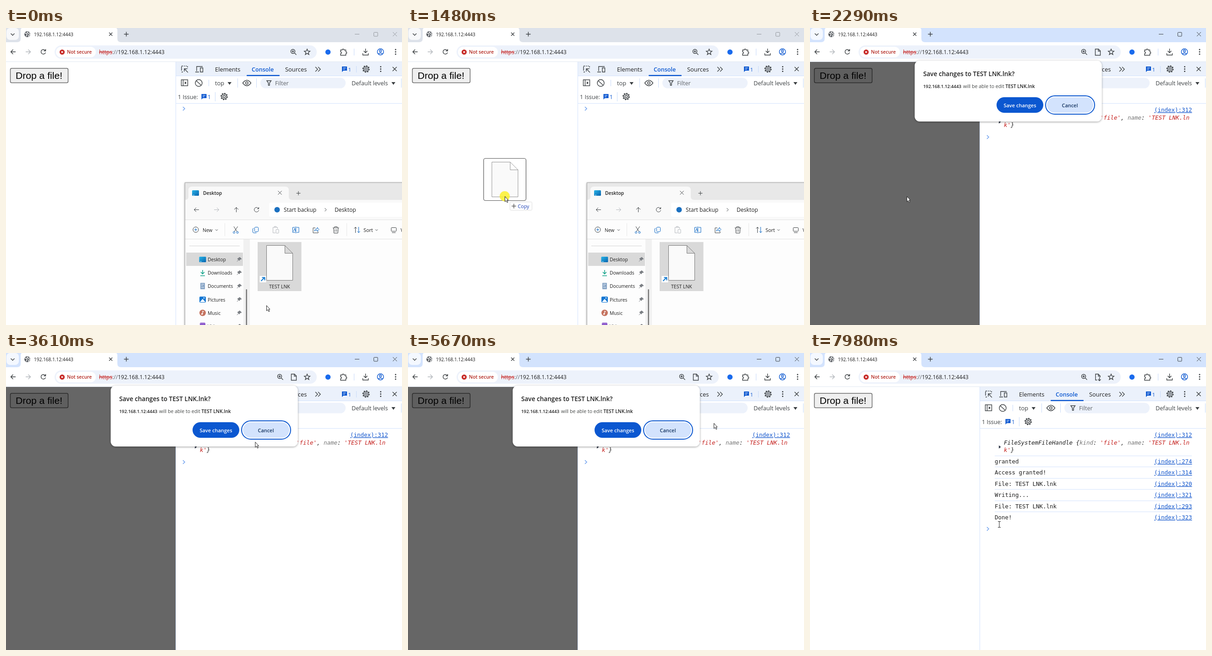
Animation of 864x648 px, one loop 8 s. Source, as an HTML page:

```html
<!DOCTYPE html>
<html lang="en">
<head>
<meta charset="utf-8">
<title>Drop a file</title>
<style>
html, body { margin: 0; width: 100%; height: 100%; overflow: hidden; background: #fff; }
svg { display: block; width: 864px; height: 648px; font: 12.9px "Open Sans", "Noto Sans", sans-serif; fill: #1f1f1f; }
text { white-space: pre; }
.line { fill: none; stroke: #3c4043; stroke-width: 1.4; }
.blue { stroke: #0b66c3; }
.pale { stroke: #b4b8bd; }
.thin { stroke-width: 1; }
.bold { font-weight: 600; }
.small { font-size: 10.3px; }
.tools { fill: #3c4043; }
.mono { font: 12.46px "DejaVu Sans Mono", "Noto Sans Mono", monospace; }
.mono .link { fill: #1155cc; text-decoration: underline; }
.rule { fill: none; stroke: #d3e3fd; }
</style>
</head>
<body>
<svg viewBox="0 0 864 648">
<defs>
  <filter id="shadow" x="-20%" y="-20%" width="140%" height="150%">
    <feDropShadow dx="0" dy="1" stdDeviation="2" flood-opacity=".4"/>
  </filter>
  <linearGradient id="screen" x2="1" y2="1"><stop stop-color="#28b5e8"/><stop offset="1" stop-color="#0862ad"/></linearGradient>
  <g id="monitor"><rect width="15" height="12" rx="1.5" fill="url(#screen)"/><path d="M2 10.500h3" stroke="#bdeaff"/></g>
  <g id="issue"><path d="M0 0h11v9H3L0 12z" fill="#0b57d0"/><path d="M2.500 3h6M2.500 6h4" stroke="#fff" stroke-width="1.200"/></g>
  <g id="gear" class="line"><circle r="2.500"/><circle r="5.500"/><circle r="7" stroke-dasharray="2.750 2.750" stroke-width="2"/></g>
  <path id="pin" d="M1-5l4 4-3 .5-2 3-4-4 3-2zM-2 1l-3 3.500" fill="#7b7f84" stroke="#7b7f84"/>
  <path id="sheet" d="M0 0H40L57 17V76H0zM40 0V17H57" stroke="#777" fill="#fafafa"/>
</defs>

<!-- browser frame -->
<rect width="864" height="648" fill="#fff"/>
<rect id="strip" width="864" height="31"/>
<rect x="1" y="0" width="27" height="26" rx="8" fill="#fff" opacity=".75"/>
<path d="M10.500 12l4 4 4-4" class="line" stroke-width="1.800"/>
<path d="M24 31q8 0 8-8V6q0-8 8-8H235q8 0 8 8V23q0 8 8 8z" fill="#fff"/>
<circle cx="46.500" cy="13.500" r="6.500" fill="#5f6368"/>
<path d="M41 11l4 1 1 3-2 3M48 8l-2 2 3 2 3-1M49 19l1-4 3-1" stroke="#fff" fill="none" stroke-width="1.400"/>
<text x="61" y="17.500" font-size="10.100">192.168.1.12:4443</text>
<path d="M225 10l7 7m0-7l-7 7M257.500 13.500h10m-5-5v10" class="line"/>
<g id="controls" class="line thin"><path d="M761 13.500h10M844 9l9 9m0-9l-9 9"/><rect x="802.500" y="9.500" width="8.500" height="8.500" rx="1"/></g>
<path d="M21 52H11m4.500-5L10.500 52l5 5" class="line"/>
<path d="M43 52h10m-4.500-5l5 5-5 5" class="line pale"/>
<path d="M85.500 49a5 5 0 1 0 .7 4.500M86.500 46v4h-4" class="line"/>
<rect x="106" y="38" width="572" height="29" rx="14.500" fill="#edf2fb"/>
<rect x="109" y="41" width="87" height="23" rx="11.500" fill="#fff"/>
<circle cx="122.500" cy="52.500" r="5.500" fill="#c5221f"/>
<path d="M120.500 50.500l4 4m0-4l-4 4" stroke="#fff" stroke-width="1.300"/>
<text x="133" y="56" class="bold" font-size="10.400" fill="#b3261e">Not secure</text>
<text x="203" y="57" font-size="12"><tspan fill="#c5221f" text-decoration="line-through">https</tspan><tspan fill="#5f6368">://</tspan>192.168.1.12:4443</text>
<g id="zoom" class="line"><circle cx="-1" cy="-1" r="4.500"/><path d="M2.500 2.500l4 4M-3.500-1h5M-1-3.500v5"/></g>
<g id="pageFile" class="line">
  <path id="plainFile" d="M622.500 46h7l4 4v9.500h-11zM629 46v4.500h4.500"/>
  <path id="savedFile" d="M626.500 59h-3.500V46h6l4 4v3M629 46v4.500h4M631.500 53v7m-3-2.500l3 3 3-3"/>
</g>
<path d="M657 46l1.700 4.200 4.500.3-3.500 2.900 1.200 4.500-3.900-2.500-3.900 2.500 1.200-4.500-3.500-2.900 4.500-.3z" class="line"/>
<circle cx="702.500" cy="52.500" r="5.700" fill="#1a6bed"/>
<path d="M730 48h3.500a2 2 0 0 1 4 0h4v4a2 2 0 0 1 0 4v3.500H730V56a2 2 0 0 0 0-4z" class="line"/>
<path d="M759.500 45v15" stroke="#c8dafa"/>
<path d="M784.500 45v9m-4-4l4 4 4-4M778.500 55v4h12v-4" class="line"/>
<g class="line" stroke="#0b57d0" style="stroke:#0b57d0"><circle cx="817" cy="52" r="6.800"/><circle cx="817" cy="50" r="2.200"/><path d="M812.500 56.500q4.500-4 9 0"/></g>
<g class="tools"><circle cx="850" cy="47" r="1.500"/><circle cx="850" cy="52" r="1.500"/><circle cx="850" cy="57" r="1.500"/></g>
<path d="M0 73.500H864" stroke="#e1e8f2"/>

<!-- page -->
<rect x="9.500" y="88" width="126" height="31.500" rx="3" fill="#efefef" stroke="#6b6b6b" stroke-width="1.500"/>
<text x="21" y="111" font-size="21.100" font-family="Liberation Sans, Arial, sans-serif" fill="#000">Drop a file!</text>
<rect id="dim" y="74" width="370" height="574" fill="#000" opacity=".6"/>

<!-- developer tools -->
<rect x="370" y="74" width="494" height="30" fill="#ebf1fb"/>
<path d="M370.500 74V648M371 104.500H864M371 164.500H864" class="rule"/>
<path d="M383 93V84m0-1h3m2 0h2m2 0h2m2 0v3m0 2v1M383 96h3M389 89l8 8M389 95v-6h6" class="line" stroke-dasharray="20 0"/>
<path d="M416 94V84h13M413 96h8M424 87h5.500v9H424z" class="line"/>
<text x="456" y="95">Elements</text>
<text x="536" y="95" class="bold" font-size="12.600" fill="#0b57d0">Console</text>
<rect x="525" y="102.500" width="72" height="2.500" rx="1" fill="#0b57d0"/>
<text x="609" y="95">Sources</text>
<path d="M675 85l5 5-5 5m6-10l5 5-5 5" class="line"/>
<use href="#issue" x="733" y="84"/>
<text x="746.500" y="94.500" font-size="11.500" fill="#0b57d0">1</text>
<path d="M764.500 83v14M442.500 113v14M505.500 110v20M546.500 110v20M862.500 110v20M456.500 140v20" stroke="#c9dbf9"/>
<use href="#gear" x="785.500" y="89.500"/>
<g class="tools"><circle cx="817.500" cy="84.500" r="1.500"/><circle cx="817.500" cy="89.500" r="1.500"/><circle cx="817.500" cy="94.500" r="1.500"/></g>
<path d="M843.500 85l9 9m0-9l-9 9" class="line"/>
<g class="line"><rect x="382.500" y="113" width="14" height="13"/><path d="M386.500 113v13"/><circle cx="420.500" cy="120" r="7.500"/><path d="M415 115l11 10"/></g>
<path d="M390 116.500v6.500l4-3.300zM483.500 118h8.500l-4.200 6zM841 118h8.500l-4.200 6z" class="tools"/>
<text x="456" y="125" class="tools">top</text>
<path d="M516.500 120q9-12 18 0-9 12-18 0z" class="line"/><circle cx="525.500" cy="120" r="2.700" class="line"/>
<rect x="555" y="108.500" width="186" height="23" rx="11.500" fill="#edf2fb"/>
<path d="M569 115h9.500l-3.500 5v5h-2.500v-5z" class="line"/>
<text x="587" y="125" fill="#5f6368" font-size="12.700">Filter</text>
<text x="754" y="125" class="tools" font-size="12.700">Default levels</text>
<text x="375" y="154.500" class="tools" font-size="12.500">1 Issue:</text>
<use href="#issue" x="426.500" y="144"/>
<text x="440" y="154.500" font-size="12" fill="#0b57d0">1</text>
<use href="#gear" x="476" y="149.500"/>
<path id="prompt" d="M-2-4l4 4-4 4" fill="none" stroke="#6ea0ee" stroke-width="1.500"/>
<g id="handle" class="mono">
  <text x="751" y="183" class="link">(index):312</text>
  <path d="M412 201.500v7l4.500-3.500z" fill="#333a4a"/>
  <g font-style="italic">
    <text x="423" y="200">FileSystemFileHandle {<tspan fill="#777">kind</tspan>: <tspan fill="#c5221f">'file'</tspan>, <tspan fill="#777">name</tspan>: <tspan fill="#c5221f">'TEST LNK.ln</tspan></text>
    <text x="423" y="216"><tspan fill="#c5221f">k'</tspan>}</text>
  </g>
</g>
<g id="log" class="mono"></g>

<!-- file manager -->
<g id="explorer">
  <rect x="390" y="337" width="490" height="320" fill="#fff" filter="url(#shadow)"/>
  <rect x="390.500" y="337.500" width="490" height="320" fill="#e8e8e8" stroke="#a9a9a9"/>
  <path d="M391 375q7 0 7-7v-14q0-8 8-8H609q8 0 8 8v14q0 7 7 7H864V648H391z" fill="#f9f9f9"/>
  <path d="M391 419H864V648H391z" fill="#fdfdfd"/>
  <path d="M391 418.500H864M391 460.500H864" stroke="#e0e0e0"/>
  <use href="#monitor" x="406" y="354"/>
  <text x="430" y="364" class="bold small">Desktop</text>
  <g class="line thin">
    <path d="M593.500 355.500l8 8m0-8l-8 8M633.500 360.500h9m-4.500-4.500v9M421 396.500H410.500m4.500-4.500l-4.500 4.500 4.500 4.500M502.500 402V391.500m-4.500 4.500l4.500-4.500 4.500 4.500M551 394a5 5 0 1 0 .5 3.500M551.500 391v3.500h-3.500M695.500 393l3.500 3.500-3.500 3.500"/>
    <path d="M454 396.500h10.500m-4.500-4.500l4.500 4.500-4.500 4.500" class="pale"/>
  </g>
  <rect x="574" y="381" width="300" height="31" rx="4" fill="#fff"/>
  <path d="M695.500 393l3.500 3.500-3.500 3.500" class="line thin"/>
  <circle cx="591.500" cy="396.500" r="6" fill="#1b70c0"/>
  <text x="606" y="400.500" font-size="12.100">Start backup</text>
  <text x="717" y="401" font-size="12.100">Desktop</text>
  <g class="line thin">
    <circle cx="414" cy="440" r="6"/><path d="M411 440h6m-3-3v6" class="blue"/>
    <path d="M457 439.500l2.500 2.500 2.500-2.500M806 439.500l2.500 2.500 2.500-2.500"/>
    <path d="M497 433l7 11M505.500 433l-7 11"/><g class="blue"><circle cx="497.500" cy="446" r="2"/><circle cx="505" cy="446" r="2"/></g>
    <rect x="542.500" y="434.500" width="8" height="10" rx="2" class="blue"/><path d="M540.500 437q-2 0-2 2v6q0 2 2 2h6" class="blue"/>
    <g class="pale"><path d="M588 447h-5.500v-12h10v3M585.500 435v-2h4v2"/><rect x="589" y="439.500" width="6" height="8" rx="1"/></g>
    <g class="blue"><path d="M631 446h-5.500v-11h5.500m3 0h5v11h-5M632.500 433v15"/><path d="M627.500 444l2.500-7 2 7"/></g>
    <path d="M675 436h-5v11h11v-3" /><path d="M673 443q1-5 6-5v-3l4 4.500-4 4.500v-3q-4 0-6 2z" class="blue"/>
    <path d="M713 436h13.500M717 436v-2.500h5.500v2.500M714.500 436l1 11.500h8.500l1-11.500M718 439v5.500m3.500-5.500v5.500"/>
    <path d="M762.500 447v-12.500m-3 3l3-3 3 3"/><path d="M769.500 434v12.500m-3-3l3 3 3-3" class="blue"/>
    <rect x="840.500" y="435.500" width="11" height="8" rx="1"/><path d="M842 446.500h8"/>
  </g>
  <path d="M477.500 426v28M743.500 426v28" stroke="#e6e6e6"/>
  <g class="small"><text x="429" y="444.500">New</text><text x="780" y="444.500" font-size="10.800">Sort</text><text x="861" y="444.500">View</text></g>
  <path d="M400 475.500H510" stroke="#d5d5d5"/>
  <rect x="518" y="461" width="14" height="187" fill="#f1f1f1"/>
  <rect x="523.500" y="570" width="2.500" height="90" rx="1" fill="#777"/>
  <rect x="393" y="490" width="124" height="29" fill="#d9d9d9"/>
  <rect id="hover" x="393" y="519" width="124" height="29" fill="#e5f3ff"/>
  <use href="#monitor" x="421.500" y="499"/>
  <path d="M429 528v8.500m-4-4l4 4 4-4M424 540.500h10" fill="none" stroke="#18a58d" stroke-width="1.600"/>
  <rect x="424" y="556" width="10" height="14" rx="1" fill="#8ba7c7"/><path d="M426 559h6m-6 3h3m-3 4h6" stroke="#e9f2fb"/>
  <rect x="422" y="586" width="14" height="13" rx="2" fill="#1277d3"/><path d="M423 598l6-7 6 7z" fill="#fff"/><circle cx="432" cy="589" r="1.300" fill="#fff"/>
  <circle cx="429" cy="621.500" r="7" fill="#c5735f"/><path d="M429 624v-6l3 1" stroke="#fff" fill="none" stroke-width="1.300"/><circle cx="427.700" cy="624" r="1.700" fill="#fff"/>
  <rect x="423" y="643" width="12" height="12" rx="2" fill="#8149c7"/><path d="M424 645.500h10" stroke="#fff" stroke-dasharray="1.500 1.500"/>
  <g id="places" class="small"></g>
  <rect x="549" y="467" width="95.500" height="107" fill="#d9d9d9"/>
  <use href="#sheet" x="568.500" y="474.500"/>
  <rect x="553.500" y="541" width="14" height="14" fill="#fff"/>
  <path d="M556.500 552l7-7M558.500 544.500h6v6" fill="none" stroke="#0f78d0" stroke-width="2"/>
  <text x="574" y="568" font-size="10.500">TEST LNK</text>
</g>

<!-- permission dialog -->
<g id="dialog">
  <rect x="228.500" y="71" width="408" height="133" rx="11" fill="#fff" filter="url(#shadow)"/>
  <text x="247" y="105" class="bold" font-size="13.600">Save changes to TEST LNK.lnk?</text>
  <text x="247" y="131" class="bold" font-size="9.750">192.168.1.12:4443</text>
  <text x="334" y="131" font-size="10.600" fill="#444746">will be able to edit</text>
  <text x="426.500" y="131" class="bold" font-size="10.300">TEST LNK.lnk</text>
  <rect id="save" x="407" y="151" width="102" height="34" rx="17"/>
  <text x="458" y="172.500" text-anchor="middle" class="bold" font-size="11" fill="#fff">Save changes</text>
  <rect x="514" y="148" width="107" height="40" rx="20" fill="#fff" stroke="#0b57d0" stroke-width="2"/>
  <rect x="517" y="151" width="101" height="34" rx="17" fill="#d3e3fd"/>
  <text x="567" y="172.500" text-anchor="middle" class="bold" font-size="10.900" fill="#14335f">Cancel</text>
</g>

<!-- pointer, with the dragged file -->
<g id="pointer">
  <g id="ghost">
    <rect x="-46" y="-82.500" width="92.500" height="92" rx="4" fill="#fff" fill-opacity=".8" stroke="#555" stroke-width="1.200"/>
    <use href="#sheet" x="-28" y="-74.500" opacity=".8"/>
  </g>
  <circle id="press" r="11" fill="#fbf02d" opacity=".85"/>
  <g id="tip">
    <rect id="tipBox" x="11.500" y="12.500" height="18" rx="2" fill="#fff" stroke="#dedede"/>
    <path id="tipSign" fill="none" stroke="#333" stroke-width="1.200"/>
    <text id="tipText" x="28.500" y="25.500" font-size="10.700" fill="#1a3fb5"></text>
  </g>
  <path id="arrow" d="M.5.500V12l2.700-2.500 2 4.300 1.800-.8-1.900-4.200H8z" fill="#fff" stroke="#222"/>
  <path id="beam" d="M-3-6.500h2q1 0 1 1V5.500q0 1-1 1H-3M3-6.500H1q-1 0-1 1M3 6.500H1q-1 0-1-1" fill="none"/>
</g>
</svg>
<script>
const LOOP = 8000;
const $ = id => document.getElementById(id);
const show = (id, on) => $(id).style.display = on ? '' : 'none';
const set = (id, name, value) => $(id).setAttribute(name, value);

$('places').innerHTML = ['Desktop', 'Downloads', 'Documents', 'Pictures', 'Music', 'Videos'].map((name, i) => {
  const y = 505 + 29.2 * i;
  return `<text x="440" y="${y + 4}">${name}</text><use href="#pin" x="509" y="${y}"/>`;
}).join('');

const messages = [
  ['granted', 274], ['Access granted!', 314], ['File: TEST LNK.lnk', 320],
  ['Writing...', 321], ['File: TEST LNK.lnk', 293], ['Done!', 323]
];
$('log').innerHTML = messages.map(([text, line], i) => {
  const y = 241 + 24.4 * i;
  return `<g><path d="M403 ${Math.round(y - 17) + .5}H833" class="rule"/>
    <text x="403" y="${y}">${text}</text><text x="751" y="${y}" class="link">(index):${line}</text></g>`;
}).join('');
const rows = [...$('log').children];

// Pointer path: time, x, y
const path = [
  [0, 568, 605], [30, 568, 605], [360, 594, 529], [450, 592, 529], [780, 466, 541],
  [1450, 211, 367], [2840, 211, 367], [3610, 543, 194], [3850, 597, 150], [4150, 430, 72],
  [4420, 311, 100], [4650, 238, 122], [4900, 310, 200], [5260, 466, 196], [5670, 667, 153],
  [5950, 525, 99], [6080, 505, 103], [6400, 400, 83], [6620, 373, 132], [6900, 453, 166],
  [7300, 453, 166], [7690, 436, 270], [7960, 413, 374], [LOOP, 413, 374]
];

// Smooth curve through the path that comes to rest at pauses
function slope(i, axis) {
  const a = path[i - 1], b = path[i], c = path[i + 1];
  if (!a || !c || (b[axis] - a[axis]) * (c[axis] - b[axis]) <= 0) return 0;
  return (c[axis] - a[axis]) / (c[0] - a[0]);
}
function pointerAt(t) {
  const i = path.findIndex((p, k) => k > 0 && t <= p[0]) - 1;
  const a = path[i], b = path[i + 1], span = b[0] - a[0], u = (t - a[0]) / span;
  return [1, 2].map(axis =>
    a[axis] + (b[axis] - a[axis]) * u * u * (3 - 2 * u) +
    span * u * (1 - u) * (slope(i, axis) * (1 - u) - slope(i + 1, axis) * u));
}

function setTip(x) {
  const copying = x < 390;
  $('tipText').textContent = copying ? 'Copy' : 'Move to Downloads';
  set('tipBox', 'width', copying ? 48 : 132);
  set('tipSign', 'd', copying ? 'M15 21.500h10m-5-5v10' : 'M15 21.500h9m-4-4l4 4-4 4');
}

function draw(t) {
  const [x, y] = pointerAt(t);
  const active = t >= 2130, asked = t >= 2190, closed = t >= 7300;
  const dragging = t >= 430 && t < 2080;
  const overSave = x > 407 && x < 509 && y > 151 && y < 185;
  const beam = t >= 6860 && (!closed || t >= 7690);

  set('strip', 'fill', active ? '#d3e3fd' : '#dde2ea');
  $('controls').style.opacity = active ? 1 : .45;
  set('zoom', 'transform', `translate(${asked ? 598 : 627} 52)`);
  show('pageFile', asked);
  show('plainFile', t < 7400);
  show('savedFile', t >= 7400);
  show('explorer', !active);
  show('dim', asked && t < 7350);
  show('handle', asked);
  show('dialog', asked && !closed);
  $('dialog').style.opacity = Math.min(1, (t - 2190) / 90);
  set('save', 'fill', overSave ? '#2569d7' : '#0b57d0');

  const logged = rows.filter((row, i) => {
    const on = t >= 7400 + 45 * i;
    row.style.display = on ? '' : 'none';
    return on;
  }).length;
  set('prompt', 'transform', `translate(388 ${asked ? 238 + 24.3 * logged : 176})`);

  set('pointer', 'transform', `translate(${x} ${y})`);
  show('ghost', dragging);
  show('press', dragging || (t >= 7220 && t < 7300));
  show('tip', dragging && x < 517);
  show('hover', dragging && x > 393 && x < 517 && y > 519 && y < 548);
  show('arrow', !beam);
  show('beam', beam);
  set('beam', 'stroke', closed ? '#222' : '#b99b62');
  setTip(x);
}

function frame(now) {
  draw(now % LOOP);
  requestAnimationFrame(frame);
}
draw(0);
requestAnimationFrame(frame);
</script>
</body>
</html>
```
